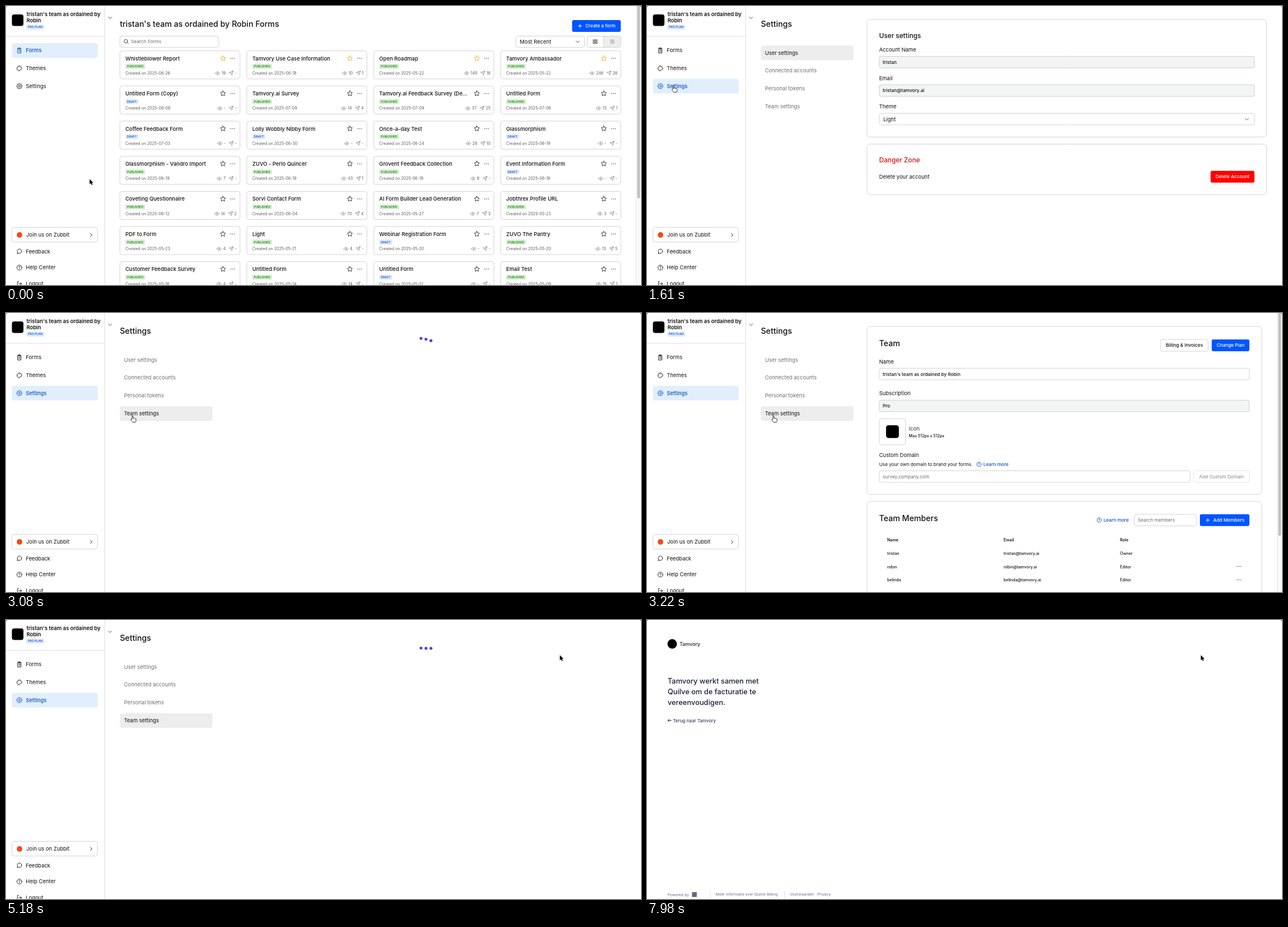
Write an HTML page with a canvas that moves like this. It is 1129x496 px and loops after 8000 ms.

```html
<!DOCTYPE html>
<html lang="en">
<head>
<meta charset="utf-8">
<title>Form dashboard</title>
<style>
html, body { margin: 0; width: 100%; height: 100%; overflow: hidden; background: #fff; }
canvas { display: block; width: 1129px; height: 496px; }
</style>
</head>
<body>
<canvas id="stage"></canvas>
<script>
const W = 1129, H = 496, LOOP = 8000, STEP = 70;
const canvas = document.getElementById('stage');
const ctx = canvas.getContext('2d');
const dpr = window.devicePixelRatio || 1;
canvas.width = W * dpr;
canvas.height = H * dpr;

// Type scale
const XS = 5.2, S = 7.06, M = 8.23, L = 9.41, XL = 11.76, XXL = 14.12;
const INK = '#111', GREY = '#6b6b6b', BLUE = '#0055ff', LINK = '#0a4fc4', LINE = '#d3d3d3';
const TEAM = "tristan's team as ordained by";

const ICONS = {
  clip: 'M6 4h12v18H6zM9 2h6v4H9zM9 11h6M9 16h6',
  palette: 'M12 2.500a9.500 9.500 0 1 0 0 19c3 0 1-3.500 2-5s7.500 1 7.500-4.500a9.500 9.500 0 0 0-9.500-9.500zM7 12v.1M9.500 7.500v.1M15 7.500v.1',
  chat: 'M21 11.500a8.800 8.800 0 0 1-12.800 7.800L3 21l1.800-5.200A8.800 8.800 0 1 1 21 11.500z',
  help: 'M22 12a10 10 0 1 1-20 0 10 10 0 0 1 20 0zM9 9.500a3 3 0 1 1 4.200 2.700c-1 .5-1.200 1-1.200 2M12 17v.2',
  logout: 'M9 21H4V3h5M16 17l5-5-5-5M21 12H9',
  eye: 'M1 12s4-7.500 11-7.500S23 12 23 12s-4 7.500-11 7.500S1 12 1 12zM15 12a3 3 0 1 1-6 0 3 3 0 0 1 6 0z',
  send: 'M22 2L11 13M22 2l-7 20-4-9-9-4z',
  star: 'M12 2l3.100 6.300 6.900 1-5 4.900 1.200 6.900-6.200-3.300-6.200 3.300L7 14.200 2 9.300l6.900-1z',
  search: 'M19 11a8 8 0 1 1-16 0 8 8 0 0 1 16 0zM22 22l-5.300-5.300',
  down: 'M4 8l8 8 8-8',
  right: 'M8 4l8 8-8 8',
  plus: 'M12 3v18M3 12h18',
  back: 'M22 12H3M11 4l-8 8 8 8',
  grid: 'M3 3h7v7H3zM14 3h7v7h-7zM3 14h7v7H3zM14 14h7v7h-7z',
  list: 'M3 5h18M3 12h18M3 19h18',
  gear: gearPath() + 'M15.500 12a3.500 3.500 0 1 1-7 0 3.500 3.500 0 0 1 7 0z'
};
for (const k in ICONS) ICONS[k] = new Path2D(ICONS[k]);

const ARROW = new Path2D('M0 0V9.200l2.100-2 1.400 3.200 1.600-.7-1.400-3.100h2.900z');
const HAND = new Path2D('M-1 6V1.200a1 1 0 0 1 2 0V4.500c.6-.6 1.700-.4 1.900.3.700-.4 1.600-.1 1.700.6.8-.3 1.600.2 1.600 1v2c0 1.600-1 2.200-1.200 3H.2C-.2 10.300-1.500 9.500-3 7.600-3.600 6.700-2.600 5.800-1.800 6.400z');

// title | status (P published, D draft) | date | views | sent
const CARDS = `Whistleblower Report|P|06-26|19|-
Tamvory Use Case Information|P|06-18|10|1
Open Roadmap|P|05-22|149|18
Tamvory Ambassador|P|05-22|246|38
Untitled Form (Copy)|D|08-06|-|-
Tamvory.ai Survey|P|07-09|14|4
Tamvory.ai Feedback Survey (De...|P|07-09|37|25
Untitled Form|P|07-08|13|1
Coffee Feedback Form|D|07-03|-|-
Lolly Wobbly Nibby Form|D|06-30|-|-
Once-a-day Test|P|06-24|28|10
Glassmorphism|D|06-19|-|-
Glassmorphism - Vandro Import|P|06-19|7|-
ZUVO - Perlo Quincer|P|06-19|43|1
Grovent Feedback Collection|P|06-18|6|-
Event Information Form|D|06-16|-|-
Coveting Questionnaire|P|06-12|14|2
Sorvi Contact Form|P|06-04|70|4
AI Form Builder Lead Generation|P|05-27|7|3
Jobthrex Profile URL|P|05-23|3|-
PDF to Form|P|05-23|4|-
Light|P|05-21|4|-
Webinar Registration Form|D|05-20|-|-
ZUVO The Pantry|P|05-20|13|5
Customer Feedback Survey|P|05-16|4|-
Untitled Form|P|05-14|14|-
Untitled Form|D|05-12|-|-
Email Test|P|05-08|15|1`.split('\n').map(row => row.split('|'));

function gearPath() {
  let d = '';
  for (let i = 0; i < 32; i++) {
    const r = i % 4 < 2 ? 10.5 : 8, a = (i - 0.5) * Math.PI / 16;
    d += (i ? 'L' : 'M') + (12 + r * Math.cos(a)).toFixed(2) + ' ' + (12 + r * Math.sin(a)).toFixed(2);
  }
  return d + 'z';
}

// Text is placed by the middle of its capitals
function text(str, x, cy, size = L, color = INK, weight = 400, align = 'left') {
  ctx.font = `${weight} ${size}px Inter, "Liberation Sans", sans-serif`;
  ctx.textAlign = align;
  ctx.fillStyle = color;
  ctx.fillText(str, x, cy + size * 0.36);
  return ctx.measureText(str).width;
}

function box(x, y, w, h, r, fill, stroke) {
  ctx.beginPath();
  ctx.roundRect(x, y, w, h, r);
  if (fill) { ctx.fillStyle = fill; ctx.fill(); }
  if (stroke) { ctx.strokeStyle = stroke; ctx.lineWidth = 1; ctx.stroke(); }
}

function dot(x, y, r, color) {
  ctx.beginPath();
  ctx.arc(x, y, r, 0, Math.PI * 2);
  ctx.fillStyle = color;
  ctx.fill();
}

function icon(name, cx, cy, size, color = INK, weight = 0.9) {
  const k = size / 24;
  ctx.save();
  ctx.translate(cx - size / 2, cy - size / 2);
  ctx.scale(k, k);
  ctx.lineWidth = weight / k;
  ctx.lineCap = ctx.lineJoin = 'round';
  ctx.strokeStyle = color;
  ctx.stroke(ICONS[name]);
  ctx.restore();
}

function more(cx, cy) {
  for (let i = -1; i <= 1; i++) dot(cx + i * 3.2, cy, 0.75, '#333');
}

function badge(label, x, y, w, bg, fg) {
  box(x, y, w, 8.6, 2, bg);
  text(label, x + w / 2, y + 4.3, XS, fg, 600, 'center');
}

function scrollbar(end) {
  ctx.fillStyle = '#fafafa';
  ctx.fillRect(1120, 0, 9, H);
  ctx.fillStyle = '#e6e6e6';
  ctx.fillRect(1120, 0, 1, H);
  box(1122.3, -4, 5, end + 4, 2.5, '#c1c1c1');
}

function sidebar(active) {
  ctx.fillStyle = '#dedede';
  ctx.fillRect(175, 0, 1, H);
  ctx.fillRect(0, 53.5, 175, 1);
  box(10.5, 15, 20.5, 20.5, 4, '#000');
  text(TEAM, 36.5, 14.5, L, INK, 600);
  text('Robin', 36.5, 26, L, INK, 600);
  badge('PRO PLAN', 36, 33.3, 32, '#dfebfd', '#1f5fd0');
  icon('down', 185, 21, 8.5, '#333');

  [['Forms', 'clip', 79], ['Themes', 'palette', 111], ['Settings', 'gear', 142.5]].forEach(([label, name, y]) => {
    const on = label === active, color = on ? LINK : INK;
    if (on) box(10.5, y - 13, 152.5, 26, 4, '#e1eefc');
    icon(name, 23.8, y, 11, color);
    text(label, 35.2, y, L, color, on ? 500 : 400);
  });

  box(10.5, 393.5, 152, 26, 4, '#fff', LINE);
  dot(24, 407, 4.9, '#f04a1d');
  text('Join us on Zubbit', 36, 407);
  icon('right', 151.5, 407, 8.5);
  [['Feedback', 'chat', 436.3], ['Help Center', 'help', 465], ['Logout', 'logout', 493.7]].forEach(([label, name, y]) => {
    icon(name, 23.8, y, 10.5);
    text(label, 35.2, y);
  });
}

function card([title, state, date, views, sent], i) {
  const x = 202.5 + (i % 4) * 225.7, y = 79.7 + Math.floor(i / 4) * 62.45;
  box(x, y, 213.5, 50, 4, '#fff', LINE);
  text(title, x + 9.7, y + 13.6, L, INK, 500);
  icon('star', x + 183.2, y + 13.2, 11, i < 4 ? '#e8b010' : '#222', 0.9);
  more(x + 200.5, y + 13.4);
  if (state === 'P') badge('PUBLISHED', x + 9.7, y + 23.4, 35, '#d3efcd', '#2c8428');
  else badge('DRAFT', x + 9.7, y + 23.4, 23, '#dce9fd', '#1f5fd0');
  text('Created on 2025-' + date, x + 9.7, y + 39.8, S, '#5c5c5c');
  const right = x + 207.5;
  const send = right - text(sent, right, y + 39.8, S, '#5c5c5c', 400, 'right') - 6.3;
  icon('send', send, y + 39.6, 8.5, '#777', 0.7);
  const eye = send - 10 - text(views, send - 10, y + 39.8, S, '#5c5c5c', 400, 'right') - 7;
  icon('eye', eye, y + 39.8, 8.8, '#777', 0.7);
}

function formsPage() {
  text(TEAM + ' Robin Forms', 202.5, 32, XXL, INK, 500);
  box(1006.5, 25, 86.5, 21, 3, BLUE);
  icon('plus', 1020.5, 35.5, 8, '#fff', 1);
  text('Create a form', 1030, 35.5, M, '#fff', 500);
  box(202.5, 53.5, 176, 20, 3.5, '#fff', LINE);
  icon('search', 213.5, 63, 9.5, '#333');
  text('Search Forms', 222.3, 63.5, M, GREY);
  box(906.5, 53.5, 122, 20, 3.5, '#fff', LINE);
  text('Most Recent', 913.5, 63.3);
  icon('down', 1016.5, 63.5, 9, '#333');
  box(1033.5, 53.5, 59.5, 20, 3.5, '#eee', LINE);
  box(1033.5, 53.5, 29, 20, [3.5, 0, 0, 3.5], '#fff', LINE);
  icon('grid', 1047.7, 63.3, 9, '#222', 0.8);
  icon('list', 1078, 63.3, 9, '#777', 0.8);
  CARDS.forEach(card);
  scrollbar(342);
}

function settingsNav(active, hover) {
  text('Settings', 202.5, 32, XXL, INK, 500);
  ['User settings', 'Connected accounts', 'Personal tokens', 'Team settings'].forEach((label, i) => {
    const y = 83.3 + i * 31.8;
    if (i === active) box(202.5, y - 13, 164.5, 26, 4, '#ededed');
    text(label, 209.7, y, L, i === active || i === hover ? INK : '#707070');
  });
}

function field(x, y, w, value, color = INK, off = false, size = M) {
  box(x, y, w, 20.5, 3.5, off ? '#f3f5f5' : '#fff', off ? '#cccfcf' : LINE);
  text(value, x + 6, y + 10.4, size, color, color === INK ? 500 : 400);
}

function button(label, x, y, w, fill, color, border, pad = 0) {
  box(x, y, w, 21, 3, fill, border);
  text(label, x + w / 2 + pad, y + 10.5, M, color, 500, 'center');
}

function userPage() {
  box(391, 24, 710.5, 209, 6, '#fff', LINE);
  text('User settings', 412.7, 52.5, XL, INK, 500);
  text('Account Name', 412.7, 77.5);
  field(413, 89.5, 667, 'tristan', INK, true);
  text('Email', 412.7, 128.3);
  field(413, 140, 667, 'tristan@tamvory.ai', INK, true);
  text('Theme', 412.7, 178.8);
  box(413, 190.8, 667, 20.5, 3.5, '#fff', LINE);
  text('Light', 420.2, 201.3);
  icon('down', 1066.5, 201.3, 9, '#333');
  box(391, 245.5, 710.5, 90, 6, '#fff', LINE);
  text('Danger Zone', 412.7, 274, XL, '#d01414', 500);
  text('Delete your account', 412.7, 303.7);
  button('Delete Account', 1002, 293, 78, '#ff0000', '#fff');
}

function learnMore(x, y) {
  icon('help', x, y, 9.5, LINK, 0.8);
  text('Learn more', x + 7.7, y + 0.2, M, LINK, 500);
}

function teamPage(filler) {
  box(391, 24, 702, 298.5, 6, '#fff', LINE);
  text('Team', 412.7, 54, XXL, INK, 500);
  button('Billing & Invoices', 913, 47, 84.5, '#fff', INK, LINE);
  button('Change Plan', 1004, 47, 67, BLUE, '#fff');
  text('Name', 412.7, 86.5);
  field(413, 98.3, 658, TEAM + ' Robin');
  if (filler) box(1050, 102.5, 12, 12, 2, '#d93a3f');
  text('Subscription', 412.7, 143);
  field(413, 155, 658, 'Pro', INK, true);
  box(413, 187.8, 46.5, 46.5, 4, '#fff', LINE);
  box(425, 199.5, 22.8, 22.8, 4.5, '#000');
  text('Icon', 465.5, 205.3, L, '#333');
  text('Max 512px x 512px', 465.5, 218.5, S, INK, 500);
  text('Custom Domain', 412.7, 252.5);
  text('Use your own domain to brand your forms.', 412.7, 269.2, M);
  learnMore(590.3, 269);
  field(413, 280.5, 553, 'survey.company.com', GREY);
  box(972, 280.5, 99, 20.5, 3.5, '#fff', '#e2e2e2');
  text('Add Custom Domain', 1021.5, 291, M, '#858585', 400, 'center');

  box(391, 335, 702, 180, 6, '#fff', LINE);
  text('Team Members', 412.7, 365, XXL, INK, 500);
  learnMore(804, 368);
  field(866.5, 358, 110.5, 'Search members', GREY);
  button('Add Members', 983, 357.7, 88, BLUE, '#fff', null, 7.5);
  icon('plus', 997, 368.2, 8, '#fff', 1);
  ['Name', 'Email', 'Role'].forEach((label, i) => text(label, 427 + i * 207, 403.7, S, INK, 600));
  ['tristan', 'robin', 'belinda'].forEach((name, i) => {
    const y = 427.5 + i * 23.6;
    text(name, 427, y, S, INK, 500);
    text(name + '@tamvory.ai', 634, y, S, INK, 500);
    text(i ? 'Editor' : 'Owner', 841, y, S, INK, 500);
    if (i) more(1052.7, y - 0.5);
  });
  scrollbar(396);
}

const ease = p => p * p * (3 - 2 * p);

// Each dot rises, dips below the rest line, then returns
function bounce(ms) {
  if (ms < 0) return 0;
  const p = ms % 600 / 200;
  if (p < 1) return -ease(p);
  if (p < 2) return 2 * ease(p - 1) - 1;
  return 1 - ease(p - 2);
}

function loader(ms) {
  for (let i = 0; i < 3; i++) dot(737.9 + i * 8.8, 50.3 + 5.2 * bounce(ms - i * 70), 2.65, '#5d3fe0');
}

function billingPage(alpha) {
  const navy = '#1a1f36', soft = '#697386';
  ctx.globalAlpha = alpha;
  dot(44.8, 42.5, 8.4, '#000');
  text('Tamvory', 58, 42.7, 8.8, navy, 500);
  ['Tamvory werkt samen met', 'Quilve om de facturatie te', 'vereenvoudigen.'].forEach((line, i) =>
    text(line, 36.7, 108 + i * 19, 12.8, navy, 500));
  icon('back', 40, 178.6, 7.5, navy, 1);
  text('Terug naar Tamvory', 46, 178.7, 8, '#3c4257', 500);
  text('Powered by', 36.5, 488.2, 6.8, soft);
  box(80, 483.8, 8.6, 8.6, 0, '#5f6b80');
  ctx.fillStyle = '#dde0e6';
  ctx.fillRect(112, 481, 1, 14);
  ctx.fillRect(244, 481, 1, 14);
  text('Meer informatie over Quilve Billing', 122, 488, 6.8, soft);
  text('Voorwaarden', 254, 488, 6.8, soft);
  text('Privacy', 302.7, 488, 6.8, soft);
  ctx.globalAlpha = 1;
}

// Pointer moves: start, end, from, to, pace
const MOVES = [
  [0, 210, 148.7, 307.8, 143.5, 304.5, ease],
  [280, 350, 143.5, 304.5, 142.5, 303.5, ease],
  [490, 560, 142.5, 303.5, 143.5, 303.5, ease],
  [700, 1190, 143.5, 303.5, 47.5, 141.8, ease],
  [1960, 2380, 47.5, 141.8, 225, 182.8, ease],
  [3570, 3920, 225, 182.8, 708, 129.8, p => p ** 1.5],
  [3920, 4410, 708, 129.8, 984.7, 62.6, p => 1 - (1 - p) ** 2.5]
];

function pointerAt(t) {
  const [a, b, x0, y0, x1, y1, pace] = MOVES.filter(m => m[0] <= t).pop();
  const k = pace(Math.min(1, (t - a) / (b - a)));
  return [x0 + (x1 - x0) * k, y0 + (y1 - y0) * k];
}

const inside = (x, y, l, t, r, b) => x >= l && x <= r && y >= t && y <= b;

function pointer(x, y, hand) {
  ctx.save();
  ctx.translate(x, y);
  ctx.lineJoin = 'round';
  ctx.lineWidth = hand ? 0.9 : 1.2;
  ctx.strokeStyle = hand ? '#111' : '#fff';
  ctx.fillStyle = hand ? '#fff' : '#000';
  const shape = hand ? HAND : ARROW;
  if (hand) { ctx.fill(shape); ctx.stroke(shape); }
  else { ctx.stroke(shape); ctx.fill(shape); }
  ctx.restore();
}

function corners() {
  ctx.fillStyle = '#777';
  for (const [x, d] of [[0, 1], [W, -1]]) {
    ctx.beginPath();
    ctx.moveTo(x, 0);
    ctx.lineTo(x + 2 * d, 0);
    ctx.lineTo(x, 2);
    ctx.fill();
  }
}

function draw(t) {
  ctx.setTransform(dpr, 0, 0, dpr, 0, 0);
  ctx.fillStyle = '#fff';
  ctx.fillRect(0, 0, W, H);
  const [x, y] = pointerAt(t);
  const onTeam = t >= 1470 && inside(x, y, 202, 166, 367, 192);
  const onBilling = t >= 3220 && t < 5110 && inside(x, y, 913, 47, 998, 68);
  const onSide = inside(x, y, 10, 129, 163, 156);

  if (t < 1470) {
    sidebar('Forms');
    formsPage();
  } else if (t < 7420) {
    sidebar('Settings');
    settingsNav(t < 2870 ? 0 : 3, onTeam ? 3 : -1);
    if (t < 2870) userPage();
    else if (t < 3220) loader((t - 2870) * 0.95);
    else if (t < 5110) teamPage(t >= 3290);
    else loader((Math.min(t, 6440) - 5110) * 0.52);
  } else if (t >= 7840) {
    billingPage(Math.min(1, (t - 7770) / 210));
  }
  corners();
  pointer(x, y, t < 7420 && (onTeam || onBilling || onSide));
}

const began = performance.now();
function tick() {
  const t = (performance.now() - began) % LOOP;
  draw(Math.floor(t / STEP) * STEP);
  requestAnimationFrame(tick);
}
tick();
</script>
</body>
</html>
```
